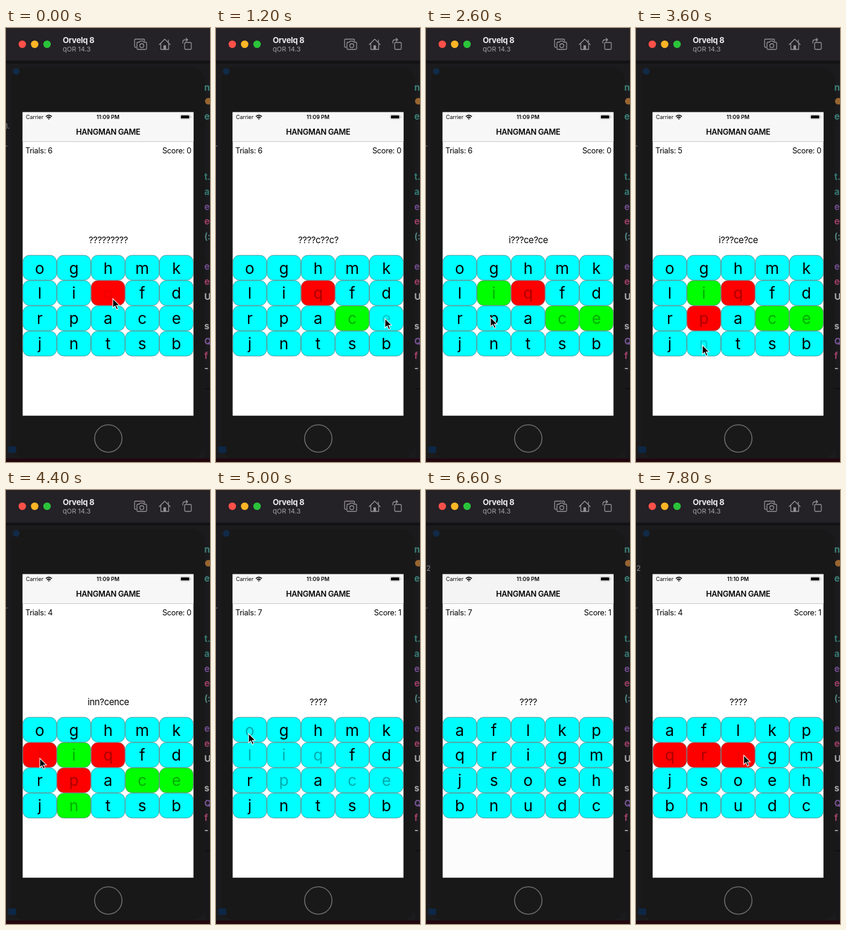
Write an HTML page that moves like this. It is 338 by 720 pixels and loops after 8 s.

```html
<!DOCTYPE html>
<html lang="en">
<head>
<meta charset="utf-8">
<title>Hangman</title>
<style>
  html, body { margin: 0; width: 100%; height: 100%; overflow: hidden; background: #1b1b1d; }
  svg { display: block; width: 338px; height: 720px; font-family: Inter, Roboto, sans-serif; letter-spacing: -.02em; }
  .label { font-size: 12.8px; }
  .status { font-size: 8.9px; letter-spacing: 0; }
  .bold { font-weight: 600; }
  .mid { text-anchor: middle; }
  .end { text-anchor: end; }
  #keys text { font-size: 26px; letter-spacing: 0; text-anchor: middle; }
  #keys rect { stroke: #56777a; stroke-width: .75; }
  #code text { font: bold 15px Inter, sans-serif; }
  .icon { fill: none; stroke: #969499; stroke-width: 1.3; stroke-linejoin: round; stroke-linecap: round; }
</style>
</head>
<body>
<svg viewBox="0 0 338 720">
  <!-- editor behind the simulator -->
  <rect width="338" height="720" fill="#1b1b1d"/>
  <rect x="330" y="570" width="8" height="150" fill="#18181b"/>
  <path d="M330 598.5h8" stroke="#070709"/>
  <rect y="714" width="338" height="6" fill="#22070f"/>

  <!-- phone body -->
  <rect x="8" y="65" width="322" height="649" rx="24" fill="#181818"/>
  <circle cx="169.5" cy="681" r="22.7" fill="#191919" stroke="#6c6c6c" stroke-width="1.6"/>

  <!-- editor fragments along the edges -->
  <g id="code" opacity=".72"></g>
  <g fill="#8a8a8e" font-size="12">
    <text id="gutter" x="-4"></text>
    <text x="-2" y="202">r</text>
  </g>
  <circle cx="17" cy="72" r="5.5" fill="#112a47"/>
  <rect x="4" y="694" width="13" height="11" rx="2" fill="#0d2746"/>

  <!-- window bar -->
  <rect y="54" width="338" height="5" fill="#131315"/>
  <rect width="338" height="54" fill="#242127"/>
  <circle cx="27" cy="27" r="6.2" fill="#ff5049"/>
  <circle cx="47.5" cy="27" r="6.2" fill="#fdb526"/>
  <circle cx="68" cy="27" r="6.2" fill="#2bc33a"/>
  <text x="94" y="24.5" font-size="13.2" font-weight="700" fill="#ececee">Orvelq 8</text>
  <text x="94" y="38.5" font-size="11" letter-spacing="0" fill="#a4a2a7">qOR 14.3</text>
  <g class="icon">
    <path d="M215.500 32H214.500Q213 32 213 30.500V20Q213 18.500 214.500 18.500H228Q229.500 18.500 229.500 20V21.500"/>
    <path d="M218.500 23.500H221L222.500 21.700H227L228.500 23.500H231.500Q233 23.500 233 25V34Q233 35.500 231.500 35.500H218.500Q217 35.500 217 34V25Q217 23.500 218.500 23.500Z"/>
    <circle cx="225" cy="29.300" r="3.300"/>
    <path d="M254 27.500L263 18.500 272 27.500M256.500 26V35.500H269.500V26M269 20V24"/>
    <rect x="261.500" y="29.500" width="3" height="6" fill="#969499"/>
    <rect x="296" y="24" width="11" height="11.500" rx="1.500"/>
    <path d="M293 25V23Q293 19.500 297 19.500H301M298.500 17L301 19.500 298.500 22"/>
  </g>

  <!-- app screen -->
  <rect x="27.600" y="139.700" width="283" height="503.500" fill="#fff"/>
  <rect x="27.600" y="139.700" width="283" height="48.800" fill="#f7f7f7"/>
  <path d="M27.600 188.500H310.600" stroke="#bcbcbc" stroke-width=".8"/>
  <text class="status" x="33" y="151">Carrier</text>
  <g fill="none" stroke="#000" stroke-width="1.700">
    <path d="M66 147Q71 142.300 76 147M68 149.200Q71 146.300 74 149.200"/>
    <path d="M71 152L69.500 150.300Q71 149.300 72.500 150.300Z" fill="#000" stroke="none"/>
  </g>
  <text id="clock" class="status bold mid" x="169" y="151"></text>
  <rect x="288.700" y="143.700" width="16" height="7.600" rx="2.200" fill="none" stroke="#a5a5a5" stroke-width=".7"/>
  <rect x="289.900" y="144.900" width="13.600" height="5.200" rx="1.200"/>
  <path d="M306.200 146.300V148.700" stroke="#a5a5a5" stroke-width=".8"/>
  <text class="label bold mid" x="169.300" y="176.800">HANGMAN GAME</text>
  <text id="trials" class="label" x="32" y="208"></text>
  <text id="score" class="label end" x="307" y="208"></text>
  <text id="word" class="mid" x="169.500" y="357" font-size="14.800"></text>
  <g id="keys"></g>
  <rect id="dim" x="27.600" y="139.700" width="283" height="503.500"/>
  <path id="cursor" d="M0 0V15.500L3.600 12.200 6.100 18 8.700 16.900 6.200 11.200H11Z" fill="#000" stroke="#fff" stroke-width="1.100"/>
</svg>
<script>
const STEP = 200, LOOP = 8000, RESET = 25;
const CYAN = '#00ffff', RED = '#ff0000', GREEN = '#00ff00';
const $ = id => document.getElementById(id);

// Each press maps a letter to the step at which the finger goes down.
const rounds = [
  { letters: 'oghmkliqfdrpacejntsb', answer: 'innocence',
    presses: { q: -1, c: 3, e: 6, i: 10, p: 14, n: 18, l: 21, o: RESET } },
  { letters: 'aflkpqrigmjsoehbnudc', answer: 'bead',
    presses: { q: 34, r: 36, i: 38 } }
];

// Pointer stops: step, x, y
const stops = [
  [0, 177, 449], [1, 177, 449], [3, 225, 482], [4, 226, 482], [6, 280, 482], [7, 280, 482],
  [10, 113, 443], [11, 113, 443], [13, 107, 480], [15, 107, 480], [18, 110, 526], [19, 110, 526],
  [21, 56, 445], [22, 56, 445], [24, 54, 404], [26, 54, 404], [30, 160, 424],
  [34, 57, 441], [35, 58, 441], [36, 118, 441], [37, 119, 441], [38, 178, 440], [40, 179, 440]
];

const svgNode = (tag, attrs, parent) => {
  const node = document.createElementNS('http://www.w3.org/2000/svg', tag);
  for (const name in attrs) node.setAttribute(name, attrs[name]);
  return parent.appendChild(node);
};

const keys = Array.from({ length: 20 }, (_, i) => {
  const x = 27.6 + (i % 5) * 56.6, y = 376.7 + Math.floor(i / 5) * 41.95;
  return {
    box: svgNode('rect', { x: x + .35, y: y + .35, width: 55.9, height: 41.25, rx: 11 }, $('keys')),
    title: svgNode('text', { x: x + 28.3, y: y + 30.8 }, $('keys'))
  };
});

const codeLines = [
  [104, 'n:', '#4ba99c'], [127, '●', '#c98238'], [152, 'er', '#4ba99c'], [252, 't.', '#3f9b91'],
  [277, 'a', '#3f9b91'], [302, 'e,', '#9560bd'], [326, 'ed', '#d24e86'], [351, '(:', '#64a7a1'],
  [401, 'e.', '#9560bd'], [426, 'ed', '#d24e86'], [451, 'Ur', '#dedee0'], [500, 's', '#dedee0'],
  [525, 'Q', '#9a6cc5'], [549, 'f', '#d24e86'], [569, '-', '#dedee0']
];
for (const [y, text, fill] of codeLines) svgNode('text', { x: 328.5, y, fill }, $('code')).textContent = text;

function pointerAt(step) {
  const next = Math.max(1, stops.findIndex(stop => stop[0] >= step));
  const [s0, x0, y0] = stops[next - 1], [s1, x1, y1] = stops[next];
  const p = (step - s0) / (s1 - s0), ease = p * p * (3 - 2 * p);
  return [x0 + (x1 - x0) * ease, y0 + (y1 - y0) * ease];
}

function keyLook(letter, step, { presses, answer }) {
  const age = step - (presses[letter] ?? Infinity);
  if (step === RESET) return [CYAN, age >= 0 && letter !== 'n' ? .32 : 1];
  if (age < 0) return [CYAN, 1];
  if (age === 0) return [CYAN, .2];
  return [answer.includes(letter) ? GREEN : RED, age === 1 ? .06 : .32];
}

function draw(step) {
  const board = rounds[step > RESET ? 1 : 0];
  const game = rounds[step >= RESET ? 1 : 0];
  const guessed = Object.keys(game.presses).filter(letter => game.presses[letter] < step);
  const misses = guessed.filter(letter => !game.answer.includes(letter)).length;

  $('trials').textContent = 'Trials: ' + (7 - misses);
  $('score').textContent = 'Score: ' + (step >= RESET ? 1 : 0);
  $('word').textContent = game.answer.replace(/./g, c => guessed.includes(c) ? c : '?');
  $('clock').textContent = step < 36 ? '11:09 PM' : '11:10 PM';
  $('gutter').textContent = step < 6 ? '3.' : step < 32 ? '' : '12';
  $('gutter').setAttribute('y', step < 32 ? 167 : 134);

  keys.forEach(({ box, title }, i) => {
    const letter = board.letters[i];
    const [fill, opacity] = keyLook(letter, step, board);
    box.setAttribute('fill', fill);
    title.textContent = letter;
    title.setAttribute('opacity', opacity);
  });

  $('dim').setAttribute('opacity', step === 32 ? .05 : step === 33 ? .012 : 0);
  $('cursor').setAttribute('transform', `translate(${pointerAt(step)})`);
  $('cursor').setAttribute('visibility', step > 30 && step < 34 ? 'hidden' : 'visible');
}

const start = performance.now();
let shown = -1;
function tick() {
  const step = Math.floor(((performance.now() - start) % LOOP) / STEP);
  if (step !== shown) draw(shown = step);
  requestAnimationFrame(tick);
}
tick();
</script>
</body>
</html>
```
